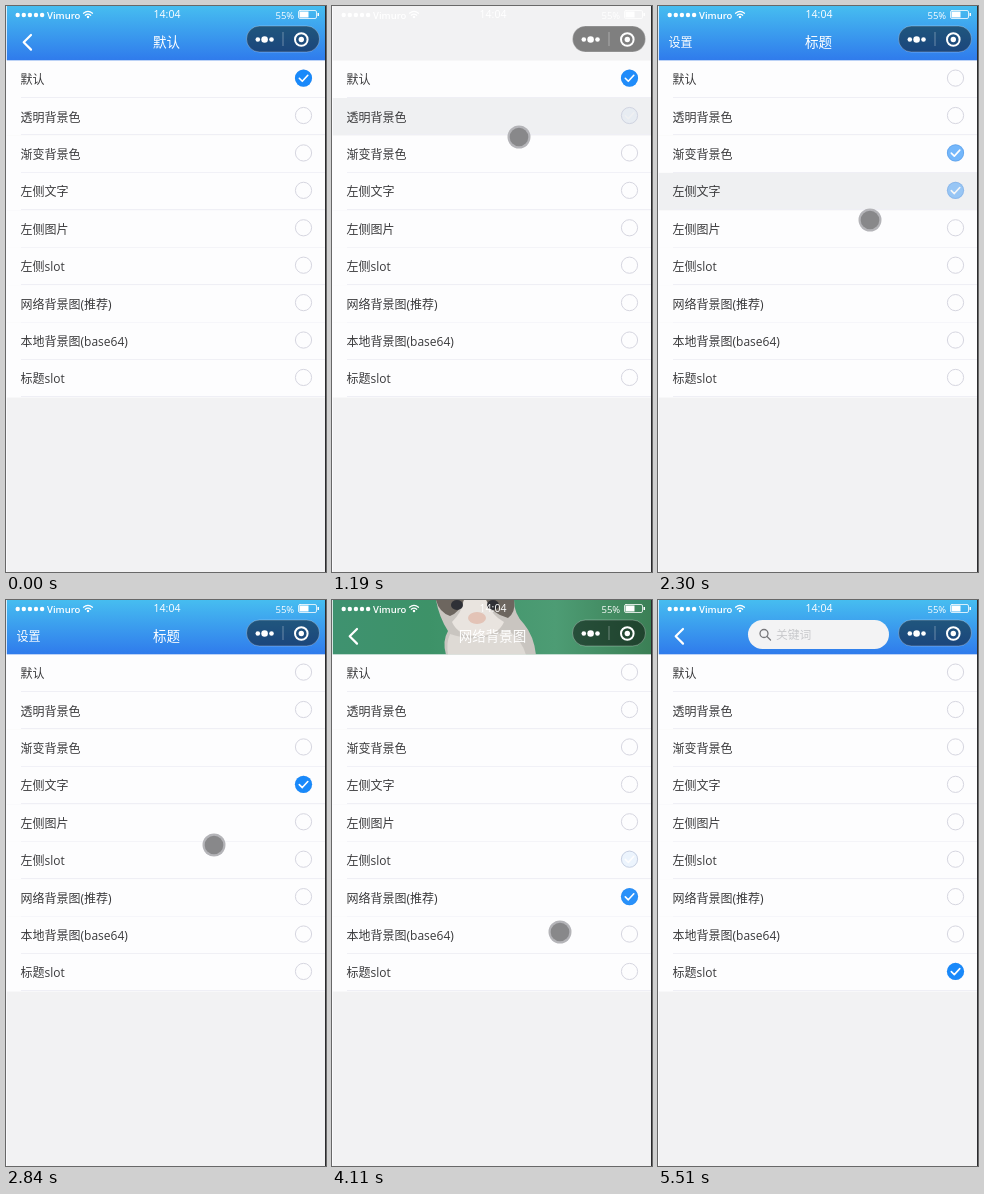
An HTML page for the animation above (6.16 s loop, 320x566 px).

```html
<!DOCTYPE html>
<html lang="zh-CN">
<head>
<meta charset="utf-8">
<title>导航栏</title>
<style>
html, body { margin: 0; width: 100%; height: 100%; overflow: hidden; background: #f2f2f3; }
svg { display: block; width: 100vw; height: 100vh; }
text { font-family: "Open Sans", "Noto Sans CJK SC", "Noto Sans CJK", sans-serif; font-size: 12px; fill: #3a3a3c; }
.bar text { fill: #fff; }
.bar .title { font-size: 13.5px; text-anchor: middle; }
.bar .dark { fill: #1c1c1e; }
.bar .hint { fill: #c8c9cc; font-size: 11.8px; }
.line { fill: none; stroke: #fff; stroke-linecap: round; stroke-linejoin: round; }
.status text { font-size: 9.5px; fill: #fff; }
</style>
</head>
<body>
<svg viewBox="0 0 320 566" preserveAspectRatio="none">
  <defs>
    <linearGradient id="sky" x2="0" y2="1">
      <stop offset="0" stop-color="#46bdf0"/>
      <stop offset="1" stop-color="#2f7aec"/>
    </linearGradient>
    <linearGradient id="leaf">
      <stop offset="0" stop-color="#3f9270"/>
      <stop offset=".3" stop-color="#3d9268"/>
      <stop offset=".7" stop-color="#4d9c74"/>
      <stop offset="1" stop-color="#3b7f55"/>
    </linearGradient>
    <linearGradient id="night">
      <stop offset="0" stop-color="#33246c"/>
      <stop offset=".25" stop-color="#3f1f86"/>
      <stop offset=".5" stop-color="#4a25a0"/>
      <stop offset=".72" stop-color="#5b2a86"/>
      <stop offset="1" stop-color="#2c1c50"/>
    </linearGradient>
    <linearGradient id="dusk" x2="0" y2="1">
      <stop offset="0" stop-color="#120c40" stop-opacity=".35"/>
      <stop offset="1" stop-color="#7a2a78" stop-opacity=".3"/>
    </linearGradient>
    <clipPath id="head"><rect width="320" height="54.6"/></clipPath>
  </defs>

  <rect width="320" height="566" fill="#f2f2f3"/>
  <g id="bars" clip-path="url(#head)"></g>
  <g id="list"></g>

  <g class="status">
    <g id="signal" fill="#fff"></g>
    <text x="41" y="12.5" font-weight="600">Vimuro</text>
    <g class="line" stroke-width="1.3">
      <path d="M77.5 7.2q4.5-3.6 9 0M79.3 9.2q2.7-2.2 5.4 0"/>
      <circle cx="82" cy="11" r=".6"/>
    </g>
    <text x="161" y="12" text-anchor="middle" style="font-size:10.5px">14:04</text>
    <text x="269.5" y="12.5">55%</text>
    <rect class="line" x="292.5" y="4.5" width="18" height="8" rx="1.5" stroke-width=".8"/>
    <rect x="293.5" y="5.5" width="9" height="6" fill="#fff"/>
    <rect x="311.5" y="7" width="1.5" height="3" fill="#fff"/>
  </g>

  <g>
    <rect x="240.5" y="20" width="73" height="26" rx="13" fill="#000" fill-opacity=".48" stroke="#fff" stroke-opacity=".28"/>
    <g fill="#fff">
      <circle cx="251.8" cy="33.5" r="2.3"/>
      <circle cx="258.6" cy="33.5" r="3.3"/>
      <circle cx="265.5" cy="33.5" r="2.3"/>
      <circle cx="295.3" cy="33.5" r="2.7"/>
    </g>
    <circle class="line" cx="295.3" cy="33.5" r="6.3" stroke-width="2"/>
    <path d="M277 26v14" stroke="#fff" stroke-opacity=".35"/>
  </g>

  <rect width="1" height="566" fill="#fdfdff" opacity=".8"/>
  <rect x="319" width="1" height="566" fill="#2c2c2e"/>
  <g id="cursor">
    <circle r="11.5" fill="#b4b4b8"/>
    <circle r="9.3" fill="#88888a"/>
  </g>
</svg>

<script>
const LOOP = 6160, TOP = 54.6, STEP = 37.42, FADE = 200, PRESS = 140;
const labels = ['默认', '透明背景色', '渐变背景色', '左侧文字', '左侧图片', '左侧slot',
  '网络背景图(推荐)', '本地背景图(base64)', '标题slot'];
// when each option is picked
const picks = [-FADE, 1185, 1600, 2220, 2845, 3468, 3925, 4400, 5000];
// cursor stops: time, x, y
const stops = [
  [370, 273, 580], [750, 133, 28], [950, 187, 131], [1320, 187, 131], [1600, 197, 170],
  [2010, 212, 213], [2300, 212, 214], [2840, 208, 245], [3450, 204, 275], [3530, 204, 275],
  [3925, 217, 310], [4110, 228, 332], [4400, 231, 348], [4680, 236, 385], [5020, 236, 386],
  [5320, 334, 411]
];

const $ = id => document.getElementById(id);
const clamp = v => Math.max(0, Math.min(1, v));
const box = fill => `<rect width="320" height="55" fill="${fill}"/>`;
const title = s => `<text class="title" x="160.5" y="41">${s}</text>`;
const left = (x, s, cls = '') => `<text class="${cls}" x="${x}" y="40.6">${s}</text>`;
const back = '<path class="line" stroke-width="2.2" d="M25 29l-7.3 7.3l7.3 7.3"/>';
const sky = box('url(#sky)');

const cat = box('url(#leaf)') + `
  <path d="M104 0h78q0 14 10 24q10 12 12 31h-90q-4-14 2-24q-9-14-12-31z" fill="#c9c5c0"/>
  <path d="M104 0h28q-4 12-14 16q-11-4-14-16zM154 0h28q2 12-6 18q-16-4-22-18z" fill="#6d665f"/>
  <path d="M132 0h22q6 16 18 22q-6 14-26 14t-26-14q10-10 12-22z" fill="#e9e4df"/>
  <ellipse cx="125" cy="5" rx="6" ry="5" fill="#2f3036"/>
  <ellipse cx="161" cy="5" rx="6" ry="5" fill="#2f3036"/>
  <ellipse cx="145" cy="18" rx="9" ry="6" fill="#e3c3b6"/>
  <path d="M118 34q28 10 58-4q14 10 18 25h-78q-2-12 2-21z" fill="#dedad5"/>`;

const space = box('url(#night)') + box('url(#dusk)') + `
  <ellipse cx="108" cy="16" rx="62" ry="20" fill="#3a35b8" opacity=".35"/>
  <ellipse cx="205" cy="30" rx="50" ry="22" fill="#a03aa0" opacity=".28"/>
  <g class="line" stroke-width="1.2" opacity=".65">
    <path d="M242 0l-10 18M271 0l-20 55M80 40l-8 15"/>
  </g>`;

const search = `
  <rect x="90" y="20" width="141" height="29" rx="14.5" fill="#f3f3f4"/>
  <g class="line" style="stroke:#77777a" stroke-width="1.3">
    <circle cx="106" cy="33.5" r="4"/><path d="M109 36.5l3.5 3.5"/>
  </g>
  <text class="hint" x="118" y="39">关键词</text>`;

const heads = [
  sky + back + title('默认'),
  '',
  sky + back + title('渐变背景色'),
  sky + left(10.5, '设置') + title('标题'),
  sky + back + title('标题'),
  left(15, '自定义slot', 'dark') + title('标题'),
  cat + back + title('网络背景图'),
  space + back + title('本地背景图'),
  sky + back + search
];
$('bars').innerHTML = heads.map(h => `<g class="bar">${h}</g>`).join('');

$('list').innerHTML = labels.map((s, i) => {
  const y = TOP + i * STEP, cy = y + 17.5;
  return `<rect class="row" y="${y}" width="320" height="${STEP + .1}"/>
    <path d="M15 ${Math.round(y + STEP) - .5}h305" stroke="#efeff5"/>
    <text x="14.5" y="${y + 23.5}">${s}</text>
    <circle cx="297.5" cy="${cy}" r="8.1" fill="none" stroke="#d6d6e0"/>
    <g class="tick"><circle cx="297.5" cy="${cy}" r="8.6" fill="#1989fa"/>
    <path class="line" stroke-width="1.6" d="M293.3 ${cy + .2}l3 3l5.5-6"/></g>`;
}).join('');

$('signal').innerHTML = [0, 1, 2, 3, 4]
  .map(i => `<circle cx="${11.7 + i * 6.1}" cy="9" r="2.2"/>`).join('');

const bars = [...document.querySelectorAll('.bar')];
const rows = [...document.querySelectorAll('.row')];
const ticks = [...document.querySelectorAll('.tick')];

function moveCursor(t) {
  const n = stops.findIndex(s => s[0] > t);
  $('cursor').style.display = n > 0 ? '' : 'none';
  if (n < 1) return;
  const [t0, x0, y0] = stops[n - 1], [t1, x1, y1] = stops[n];
  const k = (t - t0) / (t1 - t0), e = k * k * (3 - 2 * k);
  $('cursor').setAttribute('transform', `translate(${x0 + (x1 - x0) * e} ${y0 + (y1 - y0) * e})`);
}

function render(t) {
  picks.forEach((at, i) => {
    const next = picks[i + 1] ?? Infinity;
    bars[i].style.display = t >= at && t < next ? '' : 'none';
    rows[i].setAttribute('fill', i && t >= at && t < at + PRESS ? '#eff0f2' : '#fdfdfe');
    ticks[i].style.opacity = clamp((t - at) / FADE) * (1 - clamp((t - next) / FADE));
  });
  moveCursor(t);
}

const start = performance.now();
function tick() {
  render((performance.now() - start) % LOOP);
  requestAnimationFrame(tick);
}
tick();
</script>
</body>
</html>
```
